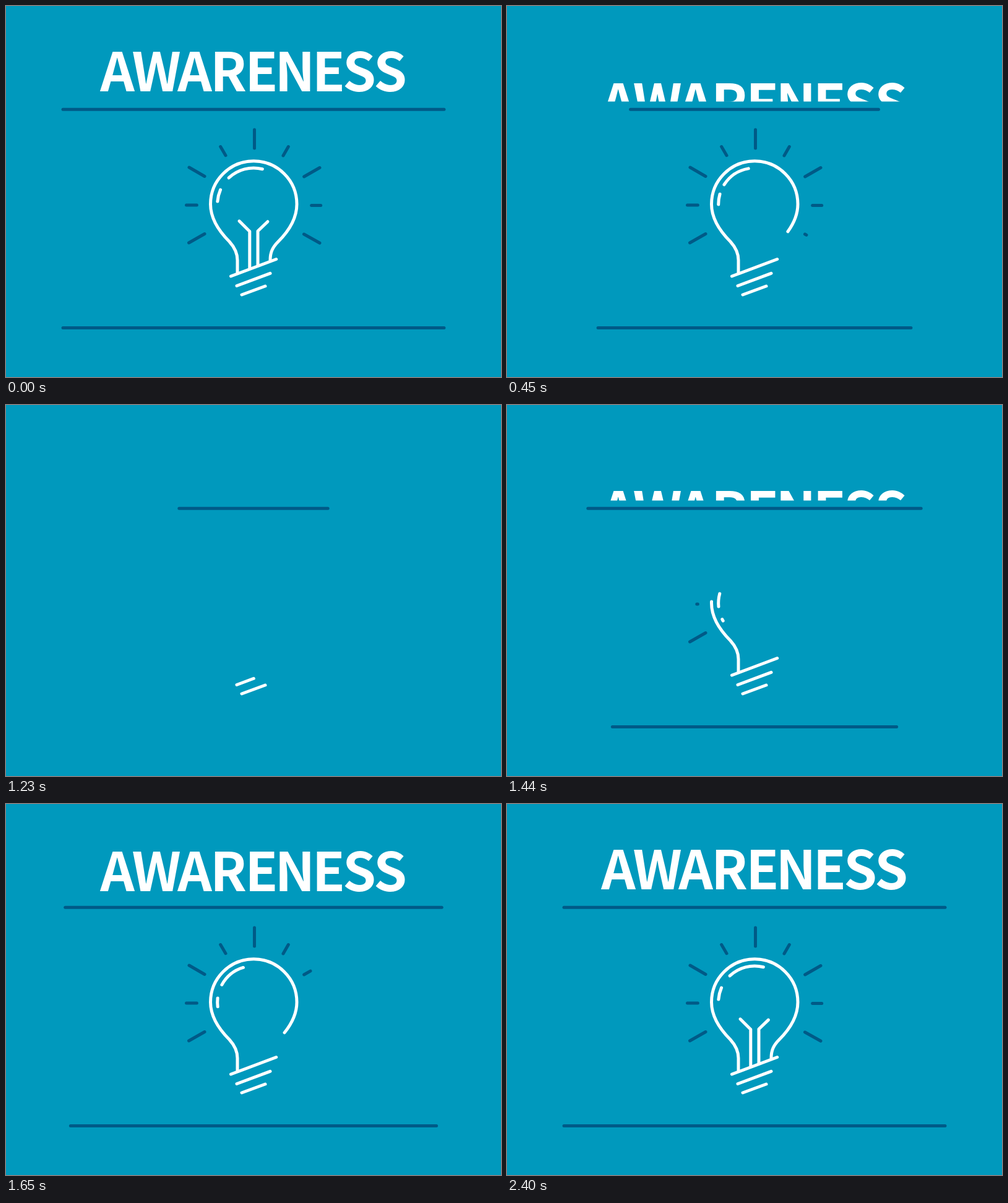
Recreate the animation shown at these times as an HTML page. Size 800 by 600 pixels, loop 2430 ms.

```html
<!DOCTYPE html>
<html lang="en">
<head>
<meta charset="utf-8">
<title>Awareness</title>
<style>
  html, body { margin: 0; width: 100%; height: 100%; overflow: hidden; background: #0099bd; }
  svg { display: block; width: 100%; height: 100%; }
  path { fill: none; stroke: #fff; stroke-width: 5; stroke-linecap: round; stroke-linejoin: round; }
  .dark path { stroke: #005a87; }
  text { font: 700 86.6px "Noto Sans CJK JP", "Noto Sans CJK SC", "Open Sans", "Noto Sans", sans-serif; fill: #fff; text-anchor: middle; }
</style>
</head>
<body>
<svg viewBox="0 0 800 600">
  <clipPath id="above"><rect width="800" height="154.5"/></clipPath>
  <g clip-path="url(#above)">
    <text id="title" y="138" x="180 243 305 359.5 413 467 521.3 571 621">AWARENESS</text>
  </g>
  <g class="dark">
    <path id="topRule"/>
    <path id="bottomRule"/>
  </g>
  <g class="dark" id="rays">
    <path d="M321 368.5L295.5 383"/>
    <path d="M308.3 322H291.5"/>
    <path d="M321 275.5L296 261"/>
    <path d="M355 241.7L346.7 227.5"/>
    <path d="M401.5 230V200"/>
    <path d="M448 242L456.3 227.5"/>
    <path d="M481.7 276L507 261.5"/>
    <path d="M493.7 322.5H508.7"/>
    <path d="M481.5 369L507 383.3"/>
  </g>
  <g id="base">
    <path d="M381 467L419 453"/>
    <path d="M373 452.5L427 432.3"/>
    <path d="M363.5 437L436.7 409.5"/>
  </g>
  <g id="filament">
    <path d="M393.8 424.5V364.5L377 347.8"/>
    <path d="M407 420V364L423.7 348"/>
  </g>
  <g id="bulb">
    <path d="M374 431V411C374 400 370 391 361 381C344 364 330.5 343 330.5 320.5A69.75 69.75 0 0 1 470 320.5C470 343 457 364 440 381C431 390 427 398 427 411"/>
  </g>
  <path id="longShine"/>
  <path id="shortShine"/>
</svg>
<script>
const STEP = 30, STEPS = 81, OUT_BEGINS = 10, IN_BEGINS = 38;
const el = id => document.getElementById(id);
const clamp = x => Math.min(1, Math.max(0, x));
const mix = (a, b, p) => a + (b - a) * p;

// cubic-bezier(x1, 1, x2, 1)
const bezierOut = (x1, x2) => x => {
  let lo = 0, hi = 1;
  for (let i = 0; i < 30; i++) {
    const s = (lo + hi) / 2, r = 1 - s;
    if (3 * x1 * s * r * r + 3 * x2 * s * s * r + s * s * s < x) lo = s; else hi = s;
  }
  return 1 - (1 - lo) ** 3;
};
const swift = bezierOut(.157, .59);
const soft = bezierOut(.208, .6);
const quad = x => 1 - (1 - x) ** 2;

// Visible share of a part: eased entrance, accelerating exit
const part = (inStart, inLength, ease, outStart, outLength, power = 3) => n => {
  if (n >= OUT_BEGINS && n < IN_BEGINS)
    return 1 - clamp((n - outStart) / outLength) ** power;
  const x = clamp(((n < OUT_BEGINS ? n + STEPS : n) - inStart) / inLength);
  return x === 0 ? 0 : x === 1 ? 1 : ease(x);
};

function show(path, visible) {
  path.style.visibility = visible ? "visible" : "hidden";
}

// Reveals the paths of a group one after another
function trimmer(id) {
  const paths = [...el(id).children];
  const lengths = paths.map(path => path.getTotalLength());
  const total = lengths.reduce((a, b) => a + b);
  return p => {
    let rest = p * total;
    paths.forEach((path, i) => {
      show(path, rest > 0);
      path.style.strokeDasharray = rest >= lengths[i] ? "none" : `${Math.max(rest, 0)} 2000`;
      rest -= lengths[i];
    });
  };
}

const rule = (id, y) => p => {
  const half = 308 * p;
  el(id).setAttribute("d", `M${400 - half} ${y}H${400 + half}`);
  show(el(id), p > 0);
};

// Arc on the inner circle, unfolding from the lower left
const shine = (id, from, to) => p => {
  const point = angle => {
    const a = mix(-35, angle, p) * Math.PI / 180;
    return `${400.2 - 58.5 * Math.cos(a)} ${320.5 - 58.5 * Math.sin(a)}`;
  };
  el(id).setAttribute("d", `M${point(from)}A58.5 58.5 0 0 1 ${point(to)}`);
  show(el(id), p > 0);
};

const title = p => el("title").setAttribute("transform", `translate(0 ${97 * (1 - p)})`);

const parts = [
  [title, part(46, 11.1, quad, 10, 6.9, 2)],
  [rule("topRule", 167.3), part(39, 22.3, swift, 10, 7.1)],
  [rule("bottomRule", 520.6), part(42, 22.3, swift, 11, 7.1)],
  [trimmer("base"), part(39, 9, quad, 17, 10)],
  [trimmer("bulb"), part(46.9, 19, swift, 10, 10)],
  [trimmer("rays"), part(47, 30, soft, 10, 10)],
  [trimmer("filament"), part(58.5, 29, soft, 10, 5)],
  [shine("longShine", 46.7, 104), part(45, 31, soft, 10, 9)],
  [shine("shortShine", 4.4, 23.5), part(47, 30, soft, 10, 10)]
];

const begin = performance.now();
function draw() {
  const n = Math.floor(Math.max(0, performance.now() - begin) / STEP) % STEPS;
  for (const [render, progress] of parts) render(progress(n));
  requestAnimationFrame(draw);
}
draw();
</script>
</body>
</html>
```
